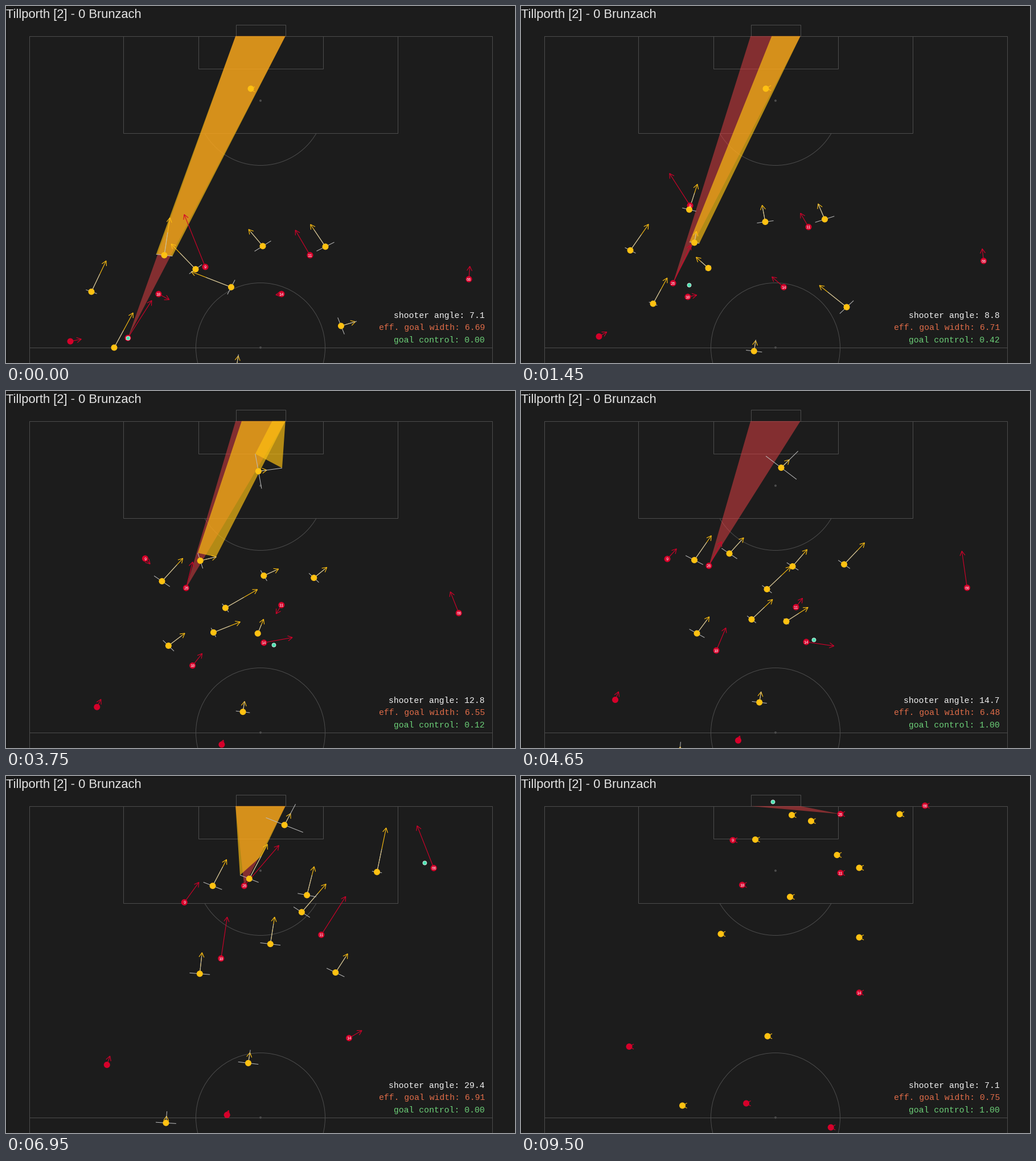
Animation of 894x626 px, one loop 9550 ms. Source, as a matplotlib script:

```python
from itertools import combinations

import numpy as np
import matplotlib.pyplot as plt
from matplotlib.animation import FuncAnimation
from matplotlib.collections import LineCollection, PolyCollection
from matplotlib.patches import Arc, Circle, Polygon, Rectangle

W, H, DPI = 894, 626, 100
PX = 72 / DPI                       # one pixel in points
FRAMES, STEP = 191, 50
SCALE = np.array([11.95, 10.3])     # pixels per metre across and along the pitch
GOAL_Y, POST_L, POST_R = 52.8, 403.2, 490.7
MARGIN = 7.5                        # how far beside the cone a player still blocks
TIMES = np.array([0, 1.45, 2.85, 4.65, 5.95, 7.95, 9.5])

BG, LINE = "#1c1c1c", "#4c4c4c"
GOLD, RED, BALL = "#ffc112", "#d6002a", "#4be3b2"

paths, colors, labels = [], [], []


def player(color, *points, label=""):
    """A run through one point for each of TIMES."""
    paths.append(points)
    colors.append(color)
    labels.append(label)


def jogger(color, start, velocity):
    """A run at constant speed."""
    player(color, *(np.array(start) + np.outer(TIMES, velocity)))


jogger(RED, (368, 650), (2.9, -8))
jogger(RED, (548, 733), (-.4, -12.3))
player(RED, (113, 588), (137, 579.5), (152.5, 565.5), (165.5, 541.5),
       (172, 522), (182.5, 492), (190, 474.5))
player(RED, (350, 457.5), (297, 350), (247, 295), (257, 294.5),
       (288, 255), (338, 183.5), (372, 112.5), label="9")
player(RED, (268, 505), (293, 510), (313, 497), (343, 455),
       (365, 388), (386, 254.5), (388.5, 191), label="10")
player(RED, (534, 437), (505, 387.5), (493, 367), (483, 379),
       (514, 337.5), (583, 219), (561, 170), label="11")
player(RED, (484, 505), (461.5, 493), (425, 454.5), (501, 440),
       (570.5, 463.5), (615, 439), (594, 380), label="14")
player(RED, (813, 479), (812.5, 447), (806.5, 418), (783.5, 345),
       (775, 239), (726, 98.5), (709.5, 52), label="66")
player(RED, (214, 582), (267, 486), (303.3, 391.5), (330, 306.5),
       (366, 256), (478.5, 128.5), (561, 66.7), label="26")
SHOOTER = len(paths) - 1

jogger(GOLD, (405, 632), (2.95, -18.5))
jogger(GOLD, (274, 691), (1, -11.9))
player(GOLD, (278, 437), (295.5, 357), (318.5, 309), (366, 285),
       (397.5, 235.5), (459.5, 126.5), (509.5, 79))
player(GOLD, (333, 461.5), (304.5, 415), (341, 403.5), (432, 347.5),
       (478, 288), (557.5, 196), (594, 161))
player(GOLD, (395.5, 493), (329, 459.5), (332, 438.5), (405, 400.5),
       (449.5, 342), (469.5, 252.5), (472.5, 212))
player(GOLD, (451, 421), (429, 378.5), (434.5, 337.5), (477, 307.5),
       (512, 257), (540, 166.5), (555, 138.5))
player(GOLD, (561, 422), (533.5, 374), (527, 344), (567.5, 304),
       (627, 240), (663, 103.5), (665, 67))
player(GOLD, (150, 501), (192, 428.5), (241, 370), (304.5, 296.5),
       (338, 239), (385.5, 151.5), (411.5, 111.5))
player(GOLD, (190, 599), (232, 522), (261, 469.5), (309, 425),
       (332.5, 383), (344, 313), (351, 277))
player(GOLD, (588.5, 561), (572, 528), (455.5, 454), (466, 404),
       (546, 375), (593.5, 314.5), (594, 283))
player(GOLD, (430, 145), (430, 145), (433, 142), (457, 134.5),
       (476.5, 107), (494, 70.5), (475.5, 68.5))
KEEPER = len(paths) - 1

POINTS = np.array(paths, float)
SPEEDS = np.gradient(POINTS, TIMES, axis=1, edge_order=2)
DEFENDS = np.array(colors) == GOLD

# time, x, y wherever the ball changes course
PASSES = np.array([(0, 214, 582), (1.45, 295, 488.5), (2.3, 437, 470),
                   (2.85, 425, 454.5), (4.65, 514, 435.5), (5.95, 665.5, 251),
                   (6.8, 766, 158), (7.95, 532, 114.5), (8.3, 512, 88), (9.5, 442, 45)])


def motion(t):
    """Positions and velocities, by cubic Hermite curves."""
    k = min(np.searchsorted(TIMES, t, side="right") - 1, len(TIMES) - 2)
    h = TIMES[k + 1] - TIMES[k]
    s = (t - TIMES[k]) / h
    p, q = POINTS[:, k], POINTS[:, k + 1]
    u, v = SPEEDS[:, k] * h, SPEEDS[:, k + 1] * h
    pos = ((2 * s**3 - 3 * s**2 + 1) * p + (s**3 - 2 * s**2 + s) * u
           + (3 * s**2 - 2 * s**3) * q + (s**3 - s**2) * v)
    vel = (6 * (s * s - s) * (p - q) + (3 * s * s - 4 * s + 1) * u
           + (3 * s * s - 2 * s) * v) / h
    return pos, vel


def ball_at(t):
    return np.array([np.interp(t, PASSES[:, 0], PASSES[:, c]) for c in (1, 2)])


def reaches(pos, ball):
    """Metres a defender can stretch: more time when the ball is far."""
    far = np.hypot(*((pos - ball) / SCALE).T)
    reach = np.minimum(1.5, .3 + .06 * far) * DEFENDS
    reach[KEEPER] *= 2
    return reach


def arrow(p, v):
    speed = np.hypot(*v)
    u = v / speed if speed > 2 else np.array([-1.0, 0.0])
    n = np.array([-u[1], u[0]])
    tip = p + v
    return [(p, tip), (tip, tip - 8 * u + 4.5 * n), (tip, tip - 8 * u - 4.5 * n)]


def zone(p, v, reach):
    """Left, front and right limits of what a defender covers."""
    m = v / SCALE
    speed = np.hypot(*m)
    if speed < .2 or not reach:
        return None
    u = m / speed
    side = np.array([-u[1], u[0]]) * SCALE * reach
    return p - side, p + u * SCALE * (reach + .42 * speed), p + side


def shadow(s, p, limits):
    """The two limits hiding most of the goal, and their span on its line."""
    if not GOAL_Y < p[1] < s[1] - 1:
        return None
    f = (s[1] - p[1]) / (s[1] - GOAL_Y)
    left, right = s[0] + (POST_L - s[0]) * f, s[0] + (POST_R - s[0]) * f
    if not left - MARGIN < p[0] < right + MARGIN:
        return None

    def project(q):
        x = s[0] + (q[0] - s[0]) * (GOAL_Y - s[1]) / (q[1] - s[1])
        return np.clip(x, POST_L, POST_R)

    ahead = [q for q in limits if GOAL_Y < q[1] < s[1] - 1]
    if len(ahead) < 2:
        return None
    a, b = max(combinations(ahead, 2), key=lambda c: abs(project(c[0]) - project(c[1])))
    return [a, b, (project(b), GOAL_Y), (project(a), GOAL_Y)]


def shot_view(s):
    """Angle between the posts in degrees and the effective goal width."""
    x, y = (np.array([[POST_L, POST_R], [GOAL_Y, GOAL_Y]]) - s[:, None]) / SCALE[:, None]
    angle = np.ptp(np.arctan2(x, -y))
    return np.degrees(angle), 2 * np.hypot(x, y).min() * np.sin(angle / 2)


fig = plt.figure(figsize=(W / DPI, H / DPI), dpi=DPI, facecolor=BG)
ax = fig.add_axes([0, 0, 1, 1])
ax.set(xlim=(0, W), ylim=(H, 0))
ax.axis("off")


def outline(patch):
    patch.set(fill=False, edgecolor=LINE, linewidth=PX, zorder=1)
    ax.add_patch(patch)


def box(x0, y0, x1, y1):
    outline(Rectangle((x0, y0), x1 - x0, y1 - y0))


box(40.5, 52.5, 853.5, 700)
box(205.5, 52.5, 687.5, 222.5)
box(337.5, 52.5, 556.5, 109.5)
box(403.5, 32.5, 490.5, 52.5)
ax.plot([40.5, 853.5], [598.5, 598.5], color=LINE, lw=PX, zorder=1)
outline(Circle((447, 599), 113.5))
outline(Arc((447, 166), 227, 227, theta1=30.1, theta2=149.9))
for y in (166, 599):
    ax.add_patch(Circle((447, y), 2, color=LINE, lw=0, zorder=1))
ax.add_patch(Rectangle((.5, .5), W - 1, H - 1, fill=False, ec="#121212", lw=PX))

cone = ax.add_patch(Polygon([(0, 0)] * 3, fc="#ea4044", alpha=.5, lw=0, zorder=2))
shades = ax.add_collection(PolyCollection([], facecolors=GOLD, alpha=.67, lw=0, zorder=3))
arrows = ax.add_collection(LineCollection([], colors=np.repeat(colors, 3),
                                          linewidths=1.1 * PX, zorder=4))
zones = ax.add_collection(LineCollection([], colors="#bdbdbd", linewidths=PX, zorder=5))


def dots(n, width, **style):
    return ax.scatter(np.zeros(n), np.zeros(n), s=(width * PX) ** 2, **style)


men = dots(len(colors), 11, c=colors, lw=0, zorder=6)
ball_dot = dots(1, 7, c=BALL, edgecolors="white", lw=.7 * PX, zorder=8)

tags = [ax.text(0, 0, s, color="white", size=7 * PX, family="Liberation Mono",
                ha="center", va="center_baseline", zorder=7) for s in labels]
ax.text(0, 21.5, "Tillporth [2] - 0 Brunzach", color="#e6e6e6", size=21.9 * PX,
        family="Liberation Sans", zorder=9)
stats = [ax.text(841, y, "", color=c, size=14.75 * PX, family="Liberation Mono",
                 ha="right", zorder=9)
         for y, c in ((547, "#f2f2f2"), (568, "#e06c48"), (590, "#6cd078"))]


def draw(i):
    t = i * STEP / 1000
    pos, vel = motion(t)
    if i == FRAMES - 1:             # no speed is known at the end
        vel = vel * 0
    ball = ball_at(t)

    s = pos[SHOOTER]
    heads, lines, hidden = [], [], []
    goal = np.linspace(POST_L, POST_R, 1001)
    free = np.ones(goal.size, bool)
    for p, v, reach in zip(pos, vel, reaches(pos, ball)):
        heads += arrow(p, v)
        limits = zone(p, v, reach)
        if limits is None:
            continue
        left, front, right = limits
        lines += [(left, right), (p, front)]
        shape = shadow(s, p, limits)
        if shape:
            hidden.append(shape)
            a, b = sorted((shape[2][0], shape[3][0]))
            free &= (goal < a) | (goal > b)

    cone.set_xy([s, (POST_L, GOAL_Y), (POST_R, GOAL_Y)])
    shades.set_verts(hidden)
    arrows.set_segments(heads)
    zones.set_segments(lines)
    men.set_offsets(pos)
    ball_dot.set_offsets([ball])
    for tag, p in zip(tags, pos):
        tag.set_position(p + (0, .3))

    angle, width = shot_view(s)
    stats[0].set_text(f"shooter angle: {angle:.1f}")
    stats[1].set_text(f"eff. goal width: {width:.2f}")
    stats[2].set_text(f"goal control: {free.mean():.2f}")
    return []


anim = FuncAnimation(fig, draw, frames=FRAMES, interval=STEP, repeat=True,
                     repeat_delay=0, init_func=lambda: draw(0))
plt.show()
```
